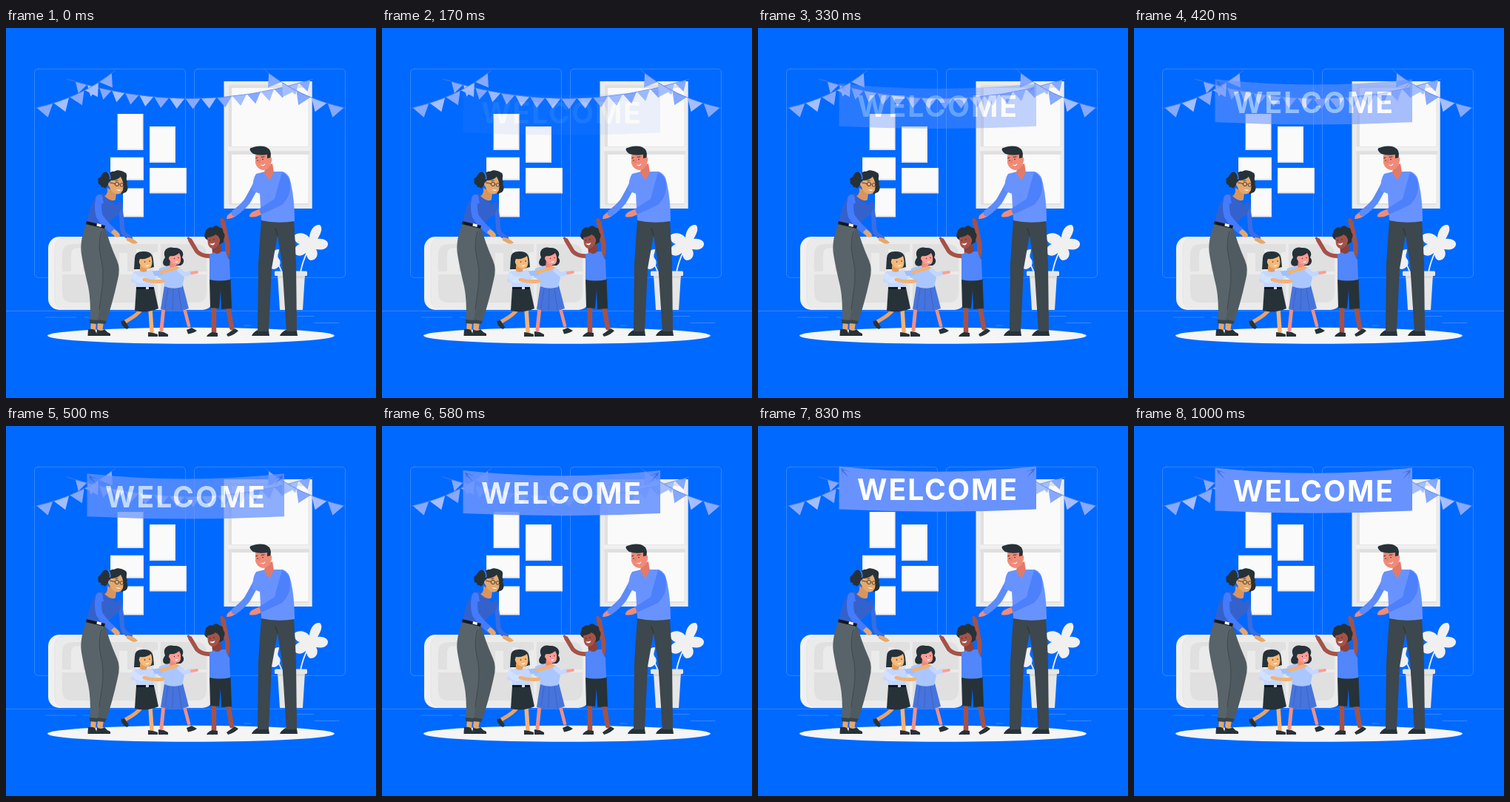
Recreate the animation shown at these times as an HTML page. Size 500 by 500 pixels, loop 1.04 s.

```html
<!DOCTYPE html>
<html lang="en">
<head>
<meta charset="utf-8">
<title>Welcome</title>
<style>
  html, body { margin: 0; width: 100%; height: 100%; overflow: hidden; background: #0069ff; }
  svg { display: block; width: 100vw; height: 100vh; }
  .line { fill: none; stroke-linecap: round; stroke-linejoin: round; }
  .dark { fill: #263238; }
  .banner-text { font: 700 39px Inter, "Open Sans", sans-serif; letter-spacing: 2px; fill: #fff; }
</style>
</head>
<body>
<svg viewBox="0 0 500 500">
  <rect width="500" height="500" fill="#0069ff"/>

  <g id="room">
    <g class="line" stroke="#4c95ff" stroke-width=".7">
      <rect x="38.5" y="55.3" width="204" height="282" rx="5"/>
      <rect x="254.5" y="55.3" width="204" height="282" rx="5"/>
      <path d="M0 382.4H500M53 391H95M105 391H112M322 402H331M394 389.5H416M417 398.5H450"/>
    </g>
    <g id="window">
      <rect x="294.5" y="72" width="119.2" height="172" fill="#ebebeb"/>
      <path d="M301 77H409V239H301Z" fill="#e0e0e0"/>
      <path d="M305 81H408.500V160H305ZM305 171H408.500V237H305Z" fill="#fafafa"/>
      <rect x="300" y="160.500" width="110" height="6" fill="#f0f0f0"/>
      <path d="M300 166.500H410V170H300Z" fill="#e0e0e0"/>
    </g>
    <g id="frames"></g>
    <g id="cabinet">
      <rect x="57" y="282" width="216" height="99" rx="15" fill="#f0f0f0"/>
      <rect x="65.500" y="282" width="215" height="99" rx="15" fill="#e6e6e6"/>
      <rect x="67" y="282.500" width="211" height="98" rx="14" fill="#ebebeb"/>
      <path d="M90 292H128V329H76V306Q76 292 90 292ZM132 292H205V329H132ZM209 292H257Q271 292 271 306V329H209ZM76 333H128V371H90Q76 371 76 357ZM132 333H205V371H132ZM209 333H271V357Q271 371 257 371H209Z" fill="#e0e0e0"/>
      <path d="M88 329V306Q88 297 100 297H104V329ZM153 304H164V329H153ZM176 299H183V329H176ZM199 303H207V329H199Z" fill="#ebebeb"/>
    </g>
    <g id="plant">
      <path class="line" d="M398 330Q401 314 408 301M372 328L366 314" stroke="#f0f0f0" stroke-width="1.800"/>
      <path d="M410 283C411 272 417 265 424 266C429 270 425 279 421 285C428 284 436 287 435 293C433 300 425 300 419 299C423 305 420 314 412 314C407 313 407 308 405 304C400 309 391 309 390 303C389 298 392 294 397 292C391 291 387 282 391 279C398 275 406 278 410 283Z" fill="#f0f0f0"/>
      <path d="M358 325C356 310 360 298 369 299C369 304 366 307 368 311C374 317 369 325 362 326Z" fill="#f0f0f0"/>
      <path d="M367 333H404L401 381H370Z" fill="#e6e6e6"/>
      <rect x="363" y="328.500" width="44" height="6.500" rx="1.500" fill="#e6e6e6"/>
      <path d="M368 335H403L402.800 338H368.300Z" fill="#d9d9d9"/>
    </g>
    <ellipse cx="250" cy="415.800" rx="194" ry="11" fill="#f5f5f5"/>
  </g>

  <g id="woman">
    <path class="line" d="M154 241Q157 256 157 271Q159 280 168 284" stroke="#3a6de0" stroke-width="6"/>
    <path d="M163 283Q170 282 178 290Q175 293 170 291L163 287Z" fill="#e6a76c"/>
    <path d="M115 396L122 397L121 410H114ZM124 396L132 398L130 410H123Z" fill="#e6a76c"/>
    <path class="dark" d="M111 407Q116 406 120 408L124 416H110.500ZM123 407Q128 411 133 407Q136 411 141 413V416H122Z"/>
    <path d="M121 262L134 268Q138 287 150 314Q155 325 151 340Q144 372 135 398L121 396Q122 368 124 342Q118 322 116 300Z" fill="#505b61"/>
    <path d="M109 263L133 269Q126 285 127 306Q133 329 130 351L124 397L113.500 396Q115 368 111 349Q105 324 102 306Q99 288 109 263Z" fill="#58636a"/>
    <path class="line" d="M129 275Q124 293 128 310Q133 328 130 351L126 380" stroke="#414c52" stroke-width="1.200"/>
    <path d="M113 394L124 395L123 400L113 399ZM124 394L136 396L134 400L123 399Z" fill="#37444b"/>
    <path d="M123 226Q132 221 139 229L148 239L156 233Q158 245 151 253Q139 261 134 270L109 263Q112 242 123 226Z" fill="#3462cc"/>
    <path d="M137 216L149 223L148 232Q143 236 133 227Q138 225 137 216Z" fill="#d9955d"/>
    <path class="line" d="M126 231Q123 241 126 254Q134 266 145 275" stroke="#447bff" stroke-width="9" stroke-linecap="butt"/>
    <path d="M121 230Q123 223 130 226L132 237H121Z" fill="#447bff"/>
    <path d="M142 276L146 272Q154 276 154 281Q151 284 147 282Z" fill="#e6a76c"/>
    <path d="M109 261L134 267L133 271L108 265Z" fill="#101820"/>
    <path d="M123 264L129 265.500L128.500 269L122.500 267.500Z" fill="#f5f5f5"/>
    <path class="dark" d="M138 196C130 191 131 201 124 204C126 207 122 211 128 212C128 217 133 214 134 217C138 213 139 209 141 204Z"/>
    <path class="dark" d="M139 207C136 197 142 193 146 194C152 190 158 194 162 196C165 200 161 204 164 208C162 212 166 215 164 219C162 224 158 222 157 225L150 212L142 214Z"/>
    <path d="M142 206Q150 206 155 201Q160 209 158 219Q155 226 148 224Q141 221 140 215Q136 211 140 208Z" fill="#e6a76c"/>
    <g class="line" stroke="#263238" stroke-width=".8">
      <circle cx="150" cy="211" r="2.700"/><circle cx="156.500" cy="212" r="2.300"/>
      <path d="M140.500 209L147 210.500M148 206.500L151 206"/>
    </g>
    <path d="M148.500 217.500Q152 219.500 155.500 218.500Q152.500 222 148.500 217.500Z" fill="#fff"/>
    <path class="line" d="M138 195Q141.500 199 140.500 204" stroke="#3974f0" stroke-width="1.800"/>
  </g>

  <g id="girlPonySkirt">
    <path class="line" d="M213 377L210 408" stroke="#f09186" stroke-width="5"/>
    <path class="line" d="M241 379L247 402" stroke="#f09186" stroke-width="4.500"/>
    <path class="dark" d="M206 410L213 411L219 414V417H206ZM244 408L251 405L258 409Q254 412 246 413.500Z"/>
    <path d="M214 348H239L247 379Q230 385 209 380Z" fill="#4774dc"/>
    <path class="line" d="M219 352L215 379M226 352L225 381M233 352L237 380" stroke="#3662c4" stroke-width=".8"/>
    <path class="dark" d="M215 310C211 301 218 295 226 297C237 296 242 304 238 310C242 314 240 319 236 321H221C213 324 209 318 215 310Z"/>
    <path d="M207 325Q220 319 235 324L241 337L238 350Q225 354 214 349L213 340L205 337Z" fill="#a9c6ff"/>
    <path d="M222 315H230V323Q226 327 221 323Z" fill="#ed8c80"/>
    <path d="M222 308Q229 309 234 304Q238 311 235 318Q231 322 225 318L222 315Q218 311 222 308Z" fill="#ff9d93"/>
    <path d="M227.500 315.500Q230.500 316.500 233 314.500Q231.500 319 227.500 315.500Z" fill="#fff"/>
    <g class="dark"><circle cx="227.500" cy="311.500" r=".7"/><circle cx="233" cy="310.500" r=".7"/></g>
    <path class="line" d="M234 327L241 333L250 331" stroke="#c3d7ff" stroke-width="6"/>
    <path class="line" d="M251 331L258 330" stroke="#ff9d93" stroke-width="3.800"/>
  </g>

  <g id="girlBob">
    <path class="line" d="M183 380Q179 387 161 397" stroke="#e8a468" stroke-width="5"/>
    <path class="line" d="M195 380L197 410" stroke="#f3b275" stroke-width="5.500"/>
    <path class="dark" d="M155 396L160 395L166 404L164 407Q157 405 155 396ZM192 411L199 412L205 414V417H192Z"/>
    <path class="line" d="M197 332L209 331" stroke="#9fbfff" stroke-width="7"/>
    <path class="line" d="M210 330L231 324" stroke="#f3b275" stroke-width="4.500"/>
    <path d="M172 330Q183 325 198 329L202 337L199 352H176L175 344L169 343Z" fill="#c3d7ff"/>
    <path d="M176 351H200L206 379Q190 386 174 382Z" fill="#263238"/>
    <path d="M176 350H200V353H176Z" fill="#101820"/>
    <rect x="189" y="350" width="4" height="3" fill="#d9d9d9"/>
    <path class="dark" d="M174 311Q174 302 185 302Q198 301 199 313L200 323L188 326L173 326Z"/>
    <path d="M181 321H190V329Q184 331 181 328Z" fill="#e39e60"/>
    <path d="M181 312Q190 313 196 308Q199 317 196 323Q189 328 183 322Q178 317 181 312Z" fill="#f5b878"/>
    <path d="M187.500 320.500Q191 321.500 194 319.500Q192 324 187.500 320.500Z" fill="#fff"/>
    <g class="dark"><circle cx="187.500" cy="316" r=".8"/><circle cx="194" cy="315" r=".8"/></g>
    <path class="line" d="M173 335Q178 342 186 340" stroke="#d2e1ff" stroke-width="8"/>
    <path class="line" d="M187 340Q198 344 212 342" stroke="#f3b275" stroke-width="4.800"/>
  </g>

  <g id="boy">
    <path class="line" d="M281 376V411M300 376L305 405" stroke="#a55248" stroke-width="6.500"/>
    <path class="dark" d="M278 411L286 412V417H271Q272 414 278 411ZM298 414L309 406L314 409Q310 414 300 417Z"/>
    <path d="M275 339H303.500L305 379L291 380L290 354L288 379L276 378Z" fill="#263238"/>
    <path class="line" d="M277 308Q265 309 258 302L249 287" stroke="#a55248" stroke-width="5.500"/>
    <path class="line" d="M246.500 284L250 289" stroke="#a55248" stroke-width="3.500"/>
    <path class="line" d="M298 308Q301 296 298 286L293 262" stroke="#a55248" stroke-width="6.500"/>
    <path class="line" d="M291.500 259L295 264" stroke="#a55248" stroke-width="4.500"/>
    <path d="M278 294L290 292L292 304H279Z" fill="#8d4139"/>
    <path d="M275 306L281 303Q286 308 291 302L297 302Q298 309 302 313L303 340Q288 343 275 340L275 320Z" fill="#5286fb"/>
    <path class="dark" d="M270 285C266 280 270 278 270 273C273 272 275 267 279 270C283 265 287 268 289 270C295 270 292 275 295 278C297 283 293 285 294 289C290 293 287 291 285 294Z"/>
    <path d="M272 283Q280 282 283 279Q290 282 289 289Q287 296 280 298Q275 298 273 292Z" fill="#a55248"/>
    <path d="M275 291.500Q279 292 282.500 290Q280.500 296 275 291.500Z" fill="#fff"/>
    <g class="dark"><circle cx="275.500" cy="287" r=".8"/><circle cx="281" cy="286" r=".8"/></g>
  </g>

  <g id="man">
    <path class="dark" d="M340 408L355 409L356 416H332Q333 412 340 408ZM378 408L393 409L394 416H370Q371 412 378 408Z"/>
    <path d="M345 259H389Q391 290 392 320L393 410H379L373 318L367 280L359 325L355 410H340L341 318Z" fill="#3c474e"/>
    <path class="line" d="M367 280L364 271" stroke="#2c363c" stroke-width="1.200"/>
    <path d="M309 246L312 253Q306 258 298 258Q297 253 309 246Z" fill="#f08b78"/>
    <path class="line" d="M341 206Q333 222 326 234Q319 243 309 250" stroke="#5c8bfa" stroke-width="9" stroke-linecap="butt"/>
    <path d="M338 197L350 194L356 203L361 194H374Q383 197 385 210Q390 232 390 261Q367 265 345 260L343 224L333 220Q333 204 338 197Z" fill="#6893ff"/>
    <path d="M350 188L360 183L362 195L356 206L349 196Z" fill="#e27a69"/>
    <path d="M373 195Q385 200 384 217Q383 229 373 239L345 252L341 245L363 231L367 216Z" fill="#4d80fb"/>
    <path d="M342 245L345 252Q336 257 329 255Q328 249 342 245Z" fill="#f08b78"/>
    <path d="M337 171L355 169Q361 176 358 183Q355 192 347 192Q340 191 337 183Z" fill="#f08b78"/>
    <path class="dark" d="M334 170Q328 165 330 162.500Q341 158 349 160Q357 162 358 170L357 177L353 176V171Q343 173 334 170Z"/>
    <circle cx="356.500" cy="178" r="2.800" fill="#f08b78"/>
    <path d="M343 184.500Q347 186.500 350.500 183Q349 189 343 184.500Z" fill="#fff"/>
    <g class="dark"><circle cx="340" cy="179" r=".8"/><circle cx="347" cy="177.500" r=".8"/></g>
    <path class="line" d="M337.500 176L340 175M345 174.500L349 174" stroke="#263238" stroke-width=".9"/>
    <path class="line" d="M343.500 178L342 182" stroke="#d4675f" stroke-width=".8"/>
  </g>

  <g id="bunting"></g>

  <g id="banner" opacity="0">
    <path d="M109.500 56.500Q243 71 376 56.500V114.500Q243 121 109.500 114.500Z" fill="#6893ff"/>
    <path d="M112 59L125 64L115 61.500L123 72L113.500 63L116 76ZM374 59L361 64L371 61.500L363 72L372.500 63L370 76Z" fill="#416fe0"/>
    <text class="banner-text" x="243" y="102" text-anchor="middle">WELCOME</text>
  </g>
</svg>

<script>
  const byId = id => document.getElementById(id);

  const pictures = [
    [150.6, 116, 35, 49], [194, 133, 35, 49], [141, 174.7, 45, 31],
    [194, 189, 50, 34.5], [158, 216.5, 28, 39]
  ];
  byId("frames").innerHTML = pictures.map(([x, y, w, h]) =>
    `<rect x="${x}" y="${y}" width="${w}" height="${h}" fill="#e8e8e8"/>
     <rect x="${x + .7}" y="${y + .7}" width="${w - 2.2}" height="${h - 2.7}" fill="#fafafa"/>`
  ).join("");

  // A string of triangular flags hung from a quadratic curve; swell widens the middle ones.
  function garland([x0, y0], [cx, cy], [x1, y1], { count, start, end, depth, swell = 0 }) {
    const at = (t, a, b, c) => (1 - t) ** 2 * a + 2 * t * (1 - t) * b + t * t * c;
    const point = u => {
      const t = start + (end - start) * (u - swell * Math.sin(2 * Math.PI * u));
      return [at(t, x0, cx, x1), at(t, y0, cy, y1)];
    };
    let flags = "";
    for (let i = 0; i < count; i++) {
      const [ax, ay] = point(i / count), [bx, by] = point((i + .94) / count);
      const length = Math.hypot(bx - ax, by - ay) * Math.sign(bx - ax);
      const tipX = (ax + bx) / 2 - (by - ay) / length * depth;
      const tipY = (ay + by) / 2 + (bx - ax) / length * depth;
      flags += `<path d="M${ax} ${ay}L${bx} ${by}L${tipX} ${tipY}Z" fill="${i % 2 ? "#a4beff" : "#86a9ff"}"/>`;
    }
    return `${flags}<path class="line" d="M${x0} ${y0}Q${cx} ${cy} ${x1} ${y1}" stroke="#4f7fe8" stroke-width=".8"/>`;
  }

  const side = { count: 5, start: .012, end: .955, depth: 16.5 };
  byId("bunting").innerHTML =
    garland([82, 69], [249, 122], [415, 69], { count: 17, start: .036, end: .991, depth: 14, swell: .024 }) +
    garland([40, 108], [103, 94], [148, 57], side) +
    garland([458, 108], [395, 94], [350, 57], side);

  const LOOP = 1040, RATE = 24, RISE = 30;

  function cubicBezier(x1, y1, x2, y2) {
    const curve = (s, a, b) => 3 * s * (1 - s) ** 2 * a + 3 * s * s * (1 - s) * b + s ** 3;
    return x => {
      let low = 0, high = 1;
      for (let i = 0; i < 30; i++) {
        const mid = (low + high) / 2;
        if (curve(mid, x1, x2) < x) low = mid; else high = mid;
      }
      return curve((low + high) / 2, y1, y2);
    };
  }
  const ease = cubicBezier(.36, -.01, .5, 1.38);
  const banner = byId("banner");

  function draw(ms) {
    const step = Math.floor((ms % LOOP + 4) * RATE / 1000);
    const progress = step < 2 ? 0 : ease(Math.min(1, step / RATE));
    banner.setAttribute("opacity", Math.max(0, Math.min(1, progress)));
    banner.setAttribute("transform", `translate(0 ${RISE * (1 - progress)})`);
  }

  const began = performance.now();
  function tick() {
    draw(performance.now() - began);
    requestAnimationFrame(tick);
  }
  tick();
</script>
</body>
</html>
```
